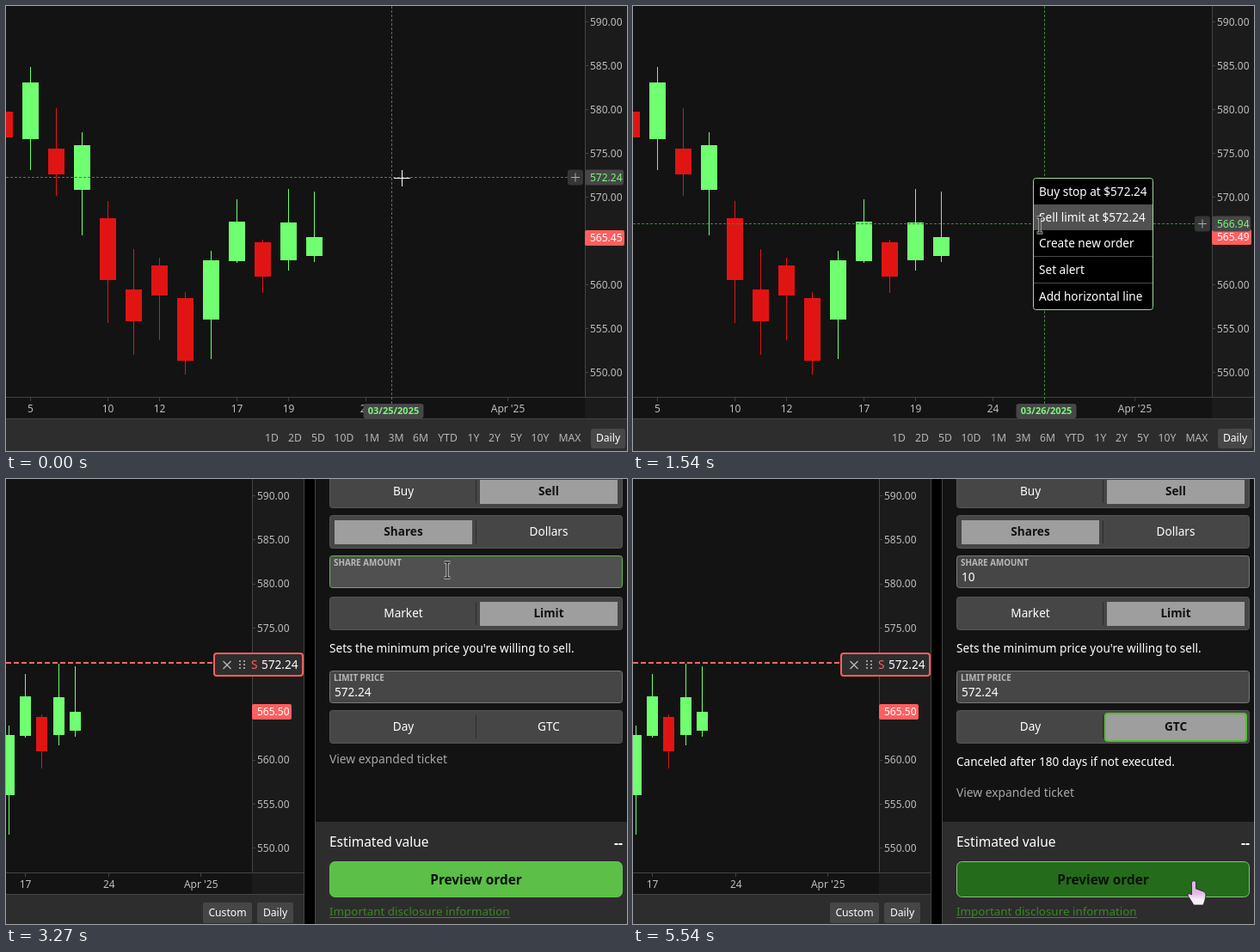
An HTML page with a canvas that plays this animation: 722 px wide and 518 px high, repeating every 5.63 s.

```html
<!DOCTYPE html>
<html lang="en">
<head>
<meta charset="utf-8">
<title>Chart order ticket</title>
<style>
html, body { margin: 0; width: 722px; height: 518px; overflow: hidden; background: #131313; }
canvas { display: block; }
</style>
</head>
<body>
<canvas id="stage" width="722" height="518"></canvas>
<script>
const c = document.getElementById('stage').getContext('2d');
const LOOP = 5630, STEPS = 62, STEP = LOOP / STEPS;
const BG = '#131313', AXIS = '#1b1b1b', BAR = '#2d2d2d', EDGE = '#444', BTN = '#464646';
const GREEN = '#70ff70', RED = '#e11414', SALMON = '#ff5f5f', LIME = '#7df57d';

// x, wick top, wick bottom, body top, body bottom, rising
const candles = [
  [-2, 123, 153, 123, 153, 0], [28, 71, 191, 89, 155, 1], [58, 119, 221, 166, 196, 0],
  [88, 147, 267, 162, 214, 1], [118, 227, 369, 247, 319, 0], [148, 283, 406, 330, 367, 0],
  [178, 293, 389, 302, 337, 0], [208, 333, 429, 340, 413, 0], [238, 285, 411, 296, 365, 1],
  [268, 225, 299, 251, 297, 1], [298, 272, 334, 275, 315, 0], [328, 213, 308, 252, 296, 1],
  [358, 216, 298, 269, 291, 1]
];
const wide = { x: 268.5, dx: 30, y: 18.5, k: 1, w: 19, right: 673, bottom: 455, end: 722, bar: 480, dateY: 468.5,
  dates: [[28, '5'], [118, '10'], [178, '12'], [268, '17'], [328, '19'], [418, '24'], [583, "Apr '25"]] };
const narrow = { x: 22.5, dx: 19.45, y: 19.5, k: 410 / 408, w: 13, right: 286, bottom: 458, end: 347, bar: 483, dateY: 471.5,
  dates: [[268, '17'], [418, '24'], [583, "Apr '25"]] };

// time, x, y
const path = [[0, 460, 200], [400, 465, 200], [454, 466, 203], [817, 472, 234], [1362, 472, 252], [1544, 473, 255],
  [1998, 481, 236], [2170, 481, 236], [2715, 513, 106], [3720, 513, 106], [3995, 533, 159], [4360, 622, 282],
  [4720, 628, 287], [5080, 629, 288], [5450, 646, 447], [5539, 652, 468]];
const level = [[0, 199.4], [454, 199.4], [817, 229.45], [1362, 253.4]];

function at(keys, t, n = 1) {
  let i = 0;
  while (i < keys.length - 1 && keys[i + 1][0] <= t) i++;
  const a = keys[i], b = keys[i + 1];
  if (!b) return a[n];
  const u = (t - a[0]) / (b[0] - a[0]);
  return a[n] + (b[n] - a[n]) * u * u * (3 - 2 * u);
}
function rect(x, y, x2, y2, color) {
  c.fillStyle = color;
  c.fillRect(x, y, x2 - x, y2 - y);
}
function box(x, y, x2, y2, fill, r = 3, stroke, width = 1) {
  const h = stroke ? width / 2 : 0;
  c.beginPath();
  c.roundRect(x + h, y + h, x2 - x - 2 * h, y2 - y - 2 * h, r);
  c.fillStyle = fill;
  c.fill();
  if (stroke) { c.strokeStyle = stroke; c.lineWidth = width; c.stroke(); }
}
// y is the middle of the capital letters
function text(s, x, y, color, size = 12, align = 'left', weight = 400) {
  c.font = `${weight} ${size}px "Noto Sans", "Open Sans", sans-serif`;
  c.textAlign = align;
  c.fillStyle = color;
  c.fillText(s, x, y + size * .357);
}
function line(x, y, x2, y2, color, width = 1, dash = []) {
  c.beginPath();
  c.moveTo(x, y);
  c.lineTo(x2, y2);
  c.setLineDash(dash);
  c.strokeStyle = color;
  c.lineWidth = width;
  c.stroke();
  c.setLineDash([]);
}

function chart(v, price) {
  const X = x => v.x + (x - 268) / 30 * v.dx;
  const Y = y => Math.round(v.y + (y - 18.5) * v.k);
  rect(0, 0, v.end, 518, BG);
  rect(v.right, 0, v.end, v.bar, AXIS);
  for (const [x, hi, lo, top, low, up] of candles) {
    const mid = X(x), color = up ? GREEN : RED, left = Math.round(mid - v.w / 2);
    rect(Math.floor(mid), Y(hi), Math.floor(mid) + 1, Y(lo), color);
    rect(left, Y(top), left + v.w, Y(low), color);
  }
  rect(v.right, 0, v.right + 1, v.bottom, EDGE);
  rect(0, v.bottom, v.end, v.bottom + 1, EDGE);
  for (let i = 0; i < 9; i++) {
    const y = v.y + i * 51 * v.k;
    rect(v.right, Math.floor(y), v.right + 4, Math.floor(y) + 1, EDGE);
    text((590 - 5 * i).toFixed(2), v.right + 6, y, '#bdbdbd');
  }
  for (const [x, s] of v.dates) {
    rect(Math.floor(X(x)), v.bottom, Math.floor(X(x)) + 1, v.bottom + 5, EDGE);
    text(s, X(x), v.dateY, '#bdbdbd', 12, 'center');
  }
  const y = Y(price > 565.47 ? 268.5 : 269.5);
  box(v.right, y - 9, v.right + 46, y + 9, SALMON, 2);
  text(price.toFixed(2), v.right + 6, y, '#fff');
  rect(0, v.bar, v.end, 518, BAR);
  rect(0, v.bar, v.end, v.bar + 1, EDGE);
}

function crosshair(t) {
  const y = at(level, t), row = Math.floor(y) + .5;
  const x = t < 400 ? 448.5 : t < 1350 ? 479.5 : 478.5;
  line(0, row, 653, row, '#3c8a3c', 1, [3, 2]);
  line(x, 0, x, 464, '#3c8a3c', 1, [3, 2]);
  box(653, row - 9, 671, row + 9, '#363636');
  line(657, row, 667, row, '#aaa');
  line(662, row - 5, 662, row + 5, '#aaa');
  box(673, row - 9, 718, row + 9, '#474747');
  text((590 - (y - 18.2) / 10.2).toFixed(2), 679, row, LIME);
  const mid = t < 400 ? 450.5 : 480.5;
  box(mid - 35, 463, mid + 35, 480, '#474747');
  text(t < 400 ? '03/25/2025' : '03/26/2025', mid, 471.5, LIME, 11, 'center', 600);
}

function menu(t) {
  const items = ['Buy stop at $572.24', 'Sell limit at $572.24', 'Create new order', 'Set alert', 'Add horizontal line'];
  const rows = [216, 246, 276, 307, 338], hot = rows[t < 860 ? 0 : 1];
  box(465, 200, 605, 354, '#000', 3, '#9fd89f');
  rect(466, hot - 15, 604, hot + 15, '#515151');
  rect(466, 291, 604, 292, '#4a4a4a');
  rect(466, 322, 604, 323, '#4a4a4a');
  items.forEach((s, i) => text(s, 472, rows[i], '#fff', 13.6));
}

function widePage(t) {
  chart(wide, t < 700 ? 565.45 : 565.49);
  const spans = { '1D': 309, '2D': 336, '5D': 363, '10D': 393, '1M': 425, '3M': 453.5, '6M': 482, 'YTD': 513.5,
    '1Y': 543.5, '2Y': 568, '5Y': 593, '10Y': 621, 'MAX': 655.5 };
  for (const s in spans) text(s, spans[s], 503, '#b5b5b5', 12.2, 'center');
  box(680, 492, 720, 515, '#474747');
  text('Daily', 700, 503, '#fff', 12.2, 'center');
  crosshair(t);
  if (t > 450) menu(t);
}

function orderTag() {
  line(0, 214, 242, 214, '#f56a6a', 2, [6, 3]);
  box(241, 202, 346, 230, BAR, 3, SALMON, 2);
  line(252.5, 212, 261.5, 221, '#bbb', 1.3);
  line(261.5, 212, 252.5, 221, '#bbb', 1.3);
  for (let i = 0; i < 6; i++) {
    const x = 271 + i % 2 * 5, y = 211 + (i >> 1) * 4;
    rect(x, y, x + 2, y + 2, '#999');
  }
  text('S', 285, 216, SALMON, 13.6);
  text('572.24', 297, 216, '#fff', 13.6, 'left', 500);
}

function choice(y, labels, picked, focus) {
  box(376, y, 717, y + 39, BTN, 3, '#565656');
  rect(546, y + 6, 547, y + 33, '#2c2c2c');
  labels.forEach((s, i) => {
    const on = i === picked, x = i ? 551 : 382;
    if (on && focus) box(x - 3, y + 3, x + 163, y + 37, '#9e9e9e', 3, '#4fc22f', 2);
    else if (on) rect(x, y + 6, x + 160, y + 34, '#9e9e9e');
    text(s, i ? 631 : 462, y + 19.5, on ? '#111' : '#fff', 13.6, 'center', on ? 700 : 500);
  });
}
function field(y, label, value, hover, border, open = true) {
  box(376, y, 717, y + 38, hover ? '#505050' : BTN, 3, border);
  if (!open) return text(label, 382, y + 19, '#aaa', 15.5);
  text(label.toUpperCase(), 381, y + 8.5, '#b8b8b8', 9.8, 'left', 600);
  text(value, 382, y + 25, '#fff', 13.6);
}

function ticketPage(t, my) {
  chart(narrow, t < 3170 ? 565.49 : 565.5);
  orderTag();
  box(229, 493, 286, 517, BTN, 2);
  text('Custom', 257.5, 505, '#fff', 12.2, 'center');
  box(292, 493, 334, 517, BTN, 2);
  text('Daily', 313, 505, '#fff', 12.2, 'center');
  rect(346, 0, 347, 518, EDGE);
  rect(347, 0, 359, 518, '#000');
  rect(359, 0, 360, 518, EDGE);
  rect(360, 0, 722, 399, BG);
  rect(360, 399, 722, 518, BAR);

  const open = t > 2890, gtc = t > 4980, over = t > 5530;
  const typing = open && !gtc, onShares = my > 89 && my < 128;
  choice(-5, ['Buy', 'Sell'], 1);
  choice(42, ['Shares', 'Dollars'], 0);
  field(89, 'Share amount', t < 3440 ? '' : t < 3620 ? '1' : '10', onShares || typing,
    typing ? '#5bbf45' : onShares ? '#e0e0e0' : '#7a7a7a', open);
  choice(137, ['Market', 'Limit'], 1);
  text("Sets the minimum price you're willing to sell.", 376, 197.5, '#fff', 13.6);
  field(223, 'Limit price', '572.24', my > 222 && my < 262, '#7a7a7a');
  choice(269, ['Day', 'GTC'], gtc ? 1 : -1, true);
  if (gtc) text('Canceled after 180 days if not executed.', 376, 329, '#fff', 13.6);
  text('View expanded ticket', 376, gtc ? 365.5 : 326.5, '#a6a6a6', 13.8);
  text('Estimated value', 376, 422, '#fff', 15.5);
  text('--', 717, 423, '#fff', 15.5, 'right', 600);
  box(376, 445, 717, 487, over ? '#256b1c' : '#5bbf48', 6, over ? '#86c47a' : '#66c653');
  text('Preview order', 546.5, 466.5, '#0b120a', 15.4, 'center', 700);
  text('Important disclosure information', 376, 503.5, '#378a22', 13.4);
  rect(376, 510, 586, 511, '#378a22');
}

const shapes = {
  arrow: new Path2D('M0 0V20L4.5 16 8 24.5 11.5 23 8 15 14 14.5Z'),
  hand: new Path2D('M-2.5 1Q0-2 2.5 1V9L11 12Q14 13 14 16L13 22 11 28H0L-3 23-7 17Q-7 13-2.5 16Z')
};
function cursor(t, x, y) {
  const kind = t < 450 ? 'cross' : t < 1500 ? 'hand' : t < 3900 ? 'beam' : t < 4300 ? 'arrow'
    : t < 5200 ? 'hand' : t < 5530 ? 'arrow' : 'hand';
  c.save();
  c.translate(Math.round(x), Math.round(y));
  if (kind === 'cross') {
    line(-9, .5, 10, .5, '#fff');
    line(.5, -9, .5, 10, '#fff');
  } else if (kind === 'beam') {
    for (const [color, w] of [['#e8e8e8', 3], ['#111', 1.4]]) {
      line(0, -9, 0, 9, color, w);
      line(-3.5, -9, 3.5, -9, color, w);
      line(-3.5, 9, 3.5, 9, color, w);
    }
  } else {
    let fill = kind === 'arrow' ? '#cfcfcf' : '#fff';
    if (t > 5530) {
      fill = c.createLinearGradient(0, 14, 0, 22);
      fill.addColorStop(0, '#e2b6e8');
      fill.addColorStop(1, '#f6f0f6');
    }
    c.fillStyle = fill;
    c.fill(shapes[kind]);
    c.strokeStyle = kind === 'arrow' ? '#eee' : '#222';
    c.lineWidth = .8;
    c.stroke(shapes[kind]);
  }
  c.restore();
}

function draw(ms) {
  const t = Math.min(STEPS - 1, Math.floor((ms % LOOP + 8) / STEP)) * STEP;
  const x = at(path, t), y = at(path, t, 2);
  c.clearRect(0, 0, 722, 518);
  if (t < 1600) widePage(t);
  else ticketPage(t, y);
  cursor(t, x, y);
}

const start = performance.now();
function tick() {
  draw(performance.now() - start);
  requestAnimationFrame(tick);
}
tick();
</script>
</body>
</html>
```
